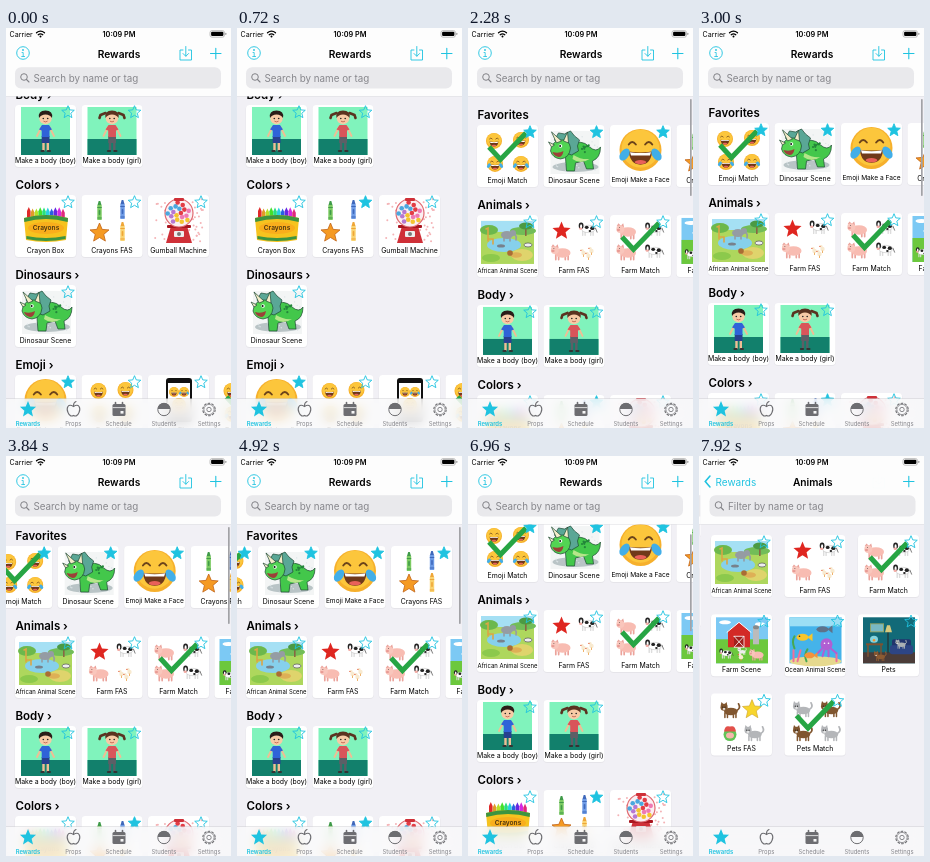
Recreate the animation shown at these times as an HTML page. Size 225 by 400 pixels, loop 8000 ms.

```html
<!DOCTYPE html>
<html lang="en">
<head>
<meta charset="utf-8">
<title>Rewards</title>
<style>
html, body { margin: 0; width: 100%; height: 100%; overflow: hidden; background: #f1f0f5; }
svg { display: block; position: absolute; left: 0; top: 0; font-family: Inter, sans-serif; }
text { dominant-baseline: central; }
#tabs { position: absolute; left: 0; top: 371px; width: 225px; height: 29px;
  background: rgba(249, 249, 250, .8); backdrop-filter: blur(6px); box-shadow: 0 -.5px 0 #cfcfd3; }
</style>
</head>
<body>
<svg id="stage" width="225" height="400" viewBox="0 0 225 400"></svg>
<div id="tabs"></div>
<script>
const CYAN = '#1fc3e0', DURATION = 8000, PITCH = 66.5;

// Drawing helpers; each returns SVG markup.
const ellipse = (x, y, rx, ry, fill, extra = '') => `<ellipse cx="${x}" cy="${y}" rx="${rx}" ry="${ry}" fill="${fill}" ${extra}/>`;
const dot = (x, y, r, fill, extra) => ellipse(x, y, r, r, fill, extra);
const box = (x, y, w, h, fill, r = 0, extra = '') => `<rect x="${x}" y="${y}" width="${w}" height="${h}" rx="${r}" fill="${fill}" ${extra}/>`;
const shape = (d, fill, extra = '') => `<path d="${d}" fill="${fill}" ${extra}/>`;
const line = (d, color, width = 1, cap = 'round') => `<path d="${d}" fill="none" stroke="${color}" stroke-width="${width}" stroke-linecap="${cap}"/>`;
const group = (content, x = 0, y = 0, scale = 1) => `<g transform="translate(${x} ${y}) scale(${scale})">${content}</g>`;
const text = (s, x, y, size, { fill = '#000', weight = 400, anchor = 'middle' } = {}) =>
  `<text x="${x}" y="${y}" font-size="${size}" fill="${fill}" font-weight="${weight}" text-anchor="${anchor}">${s}</text>`;
const star = (x, y, r, fill, extra) => {
  const points = Array.from({ length: 10 }, (_, i) => {
    const a = i * Math.PI / 5, q = i % 2 ? r * .45 : r;
    return `${(x + q * Math.sin(a)).toFixed(2)} ${(y - q * Math.cos(a)).toFixed(2)}`;
  });
  return shape(`M${points.join('L')}Z`, fill, extra);
};
const scatter = (n, seed, draw) => Array.from({ length: n }, (_, i) => {
  const random = k => { const v = Math.sin((i + 1) * 12.99 + k * 78.23 + seed) * 43758.5; return v - Math.floor(v); };
  return draw(random(1), random(2), i);
}).join('');

// Small figures, centred on the origin.
const emoji = (x, y, r, crying) => group(
  dot(0, 0, 10, '#f6b02c') + dot(0, -.6, 9, '#fcc63c') +
  line('M-5.6 -2.6Q-4 -5 -2.2 -2.6M2.2 -2.6Q4 -5 5.6 -2.6', '#6b431a', .9) +
  shape('M-5.5 .8Q0 1.6 5.5 .8Q5 7 0 7Q-5 7 -5.5 .8Z', '#70391a') + shape('M-5 1.1Q0 1.9 5 1.1L4.5 2.6H-4.5Z', '#fff') +
  ellipse(0, 5.8, 2.8, 1, '#e9605a') +
  (crying ? ellipse(-7.6, 2.2, 2, 3.2, '#42aee8', 'transform="rotate(35 -7.6 2.2)"') + ellipse(7.6, 2.2, 2, 3.2, '#42aee8', 'transform="rotate(-35 7.6 2.2)"') : ''), x, y, r / 10);
const check = line('M12 22L23.5 34.5L49 8', '#27a544', 5, 'butt');
const legs = color => line('M-6 3V8M-3 4V8M4 4V8M7 3V8', color, 1.8);
const pig = (x, y, s = .95) => group(legs('#eba39b') + ellipse(1, 1, 8.5, 5, '#f8bcb2') + dot(-7, -2, 4.2, '#f9c6bc') +
  shape('M-11 -5L-9 -8L-7 -6M-6 -6L-4 -8L-3 -4', '#eba39b') + ellipse(-9, -1, 1.8, 1.2, '#e89a94') + dot(-8, -3.6, .5, '#333'), x, y, s);
const cow = (x, y, s = .8) => group(legs('#ddd') + ellipse(1, 0, 8.5, 4.6, '#fff', 'stroke="#aaa" stroke-width=".5"') +
  ellipse(-1, -2, 2.4, 2, '#222') + ellipse(6, -1, 2.6, 2.4, '#222') + ellipse(3, 2.5, 1.6, 1.2, '#222') + ellipse(-8, -4, 3, 4, '#222') +
  ellipse(-8, -3, 1.3, 3, '#fff') + ellipse(-8.5, -.4, 2, 1.5, '#f2aaa3') + line('M10 -1L12 4', '#333', .8), x, y, s);
const pet = (x, y, color, s = .85) => group(legs(color) + ellipse(1, 1, 8, 4.5, color) + dot(-7, -4, 4.2, color) +
  shape('M-11 -6L-10 -10L-7 -7L-4 -10L-3 -5Z', color) + line('M8 0Q13 -3 10 -8', color, 2) +
  dot(-8.5, -4, .7, '#222') + dot(-5.8, -4, .7, '#222') + ellipse(-7, -2, 1.5, 1, '#eee'), x, y, s);
const chick = (x, y) => dot(x, y + 1, 2.2, '#f8ead0') + dot(x - 1.3, y - 1.6, 1.4, '#f8ead0') + line(`M${x} ${y + 3}v1.6`, '#e8912d', .7) + dot(x - 2.6, y - 1.6, .6, '#e0522d');
const crayon = (x, y, color, dark) => shape(`M${x - 2} ${y - 6}L${x - .8} ${y - 10}H${x + .8}L${x + 2} ${y - 6}Z`, dark) +
  box(x - 2.2, y - 6, 4.4, 15, color) + box(x - 2.2, y - 4, 4.4, 1, dark) + box(x - 2.2, y + 6.5, 4.4, 1, dark) + box(x - .8, y - 1, 1.6, 5, dark, .8);
const fourEmoji = emoji(17, 16, 8) + emoji(44, 15, 8) + emoji(18, 39, 8, true) + emoji(44, 39, 8, true);

const kid = (shirt, pants, hair, girl) => box(6, 2, 49, 48, '#80f3bc') + box(6, 34, 49, 16, '#12806c') +
  (girl ? line('M24 8L19 10L18 13M37 8L42 10L43 13', hair, 2.6) : '') +
  line('M26.5 22L22 31M34.5 22L39 31', '#f0bd94', 1.9) + line('M28.5 36V45M32.8 36V45', girl ? pants : '#f0bd94', 2.4) +
  box(26.7, 31, 7.8, 7, pants) + shape('M27 20H34L37 24.5L34.5 25.5V32H26.7V25.5L24 24.5Z', shirt) +
  dot(30.5, 13.2, 6.2, '#f7cba6') + shape('M24 13Q22.6 5.5 30.5 5.5Q38.4 5.5 37 13Q35 9.5 30.5 9.5Q26 9.5 24 13Z', hair) +
  dot(28.3, 13.5, .8, '#222') + dot(32.7, 13.5, .8, '#222') + line('M28.8 16.4Q30.5 17.6 32.2 16.4', '#b5483d', .7) +
  line('M26.4 46H28.6M32.8 46H35', '#333', 2);

const outline = 'stroke="#1d4a33" stroke-width=".7"';
const pictures = {
  emojiMatch: fourEmoji + check,
  emojiSet: fourEmoji,
  emojiFace: emoji(30.5, 25, 21, true),
  emojiPhone: box(18, 3, 26, 44, '#111', 3) + box(20, 8, 22, 34, '#fff') + emoji(26, 17, 5) + emoji(36, 17, 5, true) + emoji(31, 30, 7),
  dinosaur: box(7, 6, 49, 43, '#f3f5f5') + ellipse(32, 42, 23, 5, '#b9c4c6') + scatter(40, 3, (a, b) => dot(9 + a * 45, 8 + b * 39, .7, '#dce4e6')) +
    shape('M24 21Q38 13 46 22Q53 28 57 22Q57 33 49 36L50 44H43L40 36L32 38L31 46H23L22 33Z', '#43c74b', outline) +
    shape('M29 34Q37 40 46 34Q38 35 30 30Z', '#b5e68a') +
    shape('M11 15L15 8L21 9L27 6L31 11L36 15L34 21L35 26L28 30L20 27Z', '#5aa796', outline) +
    shape('M7 26Q8 17 16 15Q26 14 27 23Q26 33 17 34Q9 33 7 26Z', '#52d453', outline) +
    shape('M13 18L8 7L18 16ZM20 16L24 7L25 18ZM8 22L5 17L11 20Z', '#f4ecc8', outline) +
    dot(17, 21, 1.8, '#fff') + dot(16.6, 21, 1, '#111') + shape('M9 27Q15 29 20 26Q19 32 15 32Q10 31 9 27Z', '#9c4038') +
    scatter(9, 9, (a, b) => dot(31 + a * 16, 20 + b * 9, 1.1, '#23863a')),
  crayons: crayon(18, 16, '#7ccb62', '#3f9a48') + crayon(41, 15, '#6d9be6', '#3f68bb') + star(18, 38, 10, '#f59a23', 'stroke="#c2651a" stroke-width=".8"') + crayon(41, 37, '#f9d372', '#efa637'),
  crayonBox: scatter(10, 0, (a, b, i) => shape(`M${12 + i * 3.8} 25V${16 + b * 2}l1.8 -4l1.8 4V25Z`, `hsl(${i * 37} 75% 52%)`)) +
    shape('M9 23Q31 17 53 23L51 45Q31 49 11 45Z', '#f6c31f') + shape('M9 23Q31 17 53 23L52.7 27Q31 21 9.3 27Z', '#3d9440') + shape('M11.4 41Q31 45 50.6 41V44Q31 48 11.4 44Z', '#3d9440') +
    ellipse(31, 33, 18, 6, '#f9ae1c') + text('Crayons', 31, 33, 6.6, { weight: 600, fill: '#4a3310' }),
  gumball: scatter(60, 5, (a, b) => dot(6 + a * 49, 4 + b * 43, 1, '#f4b3b6')) +
    shape('M23 31H39L44 48H18Z', '#cf3038') + box(26, 36, 10, 6, '#eee', 1) + dot(31, 39, 2, '#777') + box(19, 30, 24, 3, '#a9161f', 1) +
    dot(31, 18, 14, '#fbeff2', 'stroke="#e0686f" stroke-width="1.2"') +
    scatter(18, 2, (a, b, i) => dot(31 + Math.sqrt((i + .5) / 18) * 11.5 * Math.cos(i * 2.4), 18 + Math.sqrt((i + .5) / 18) * 11.5 * Math.sin(i * 2.4), 2.3, ['#e23c45', '#f4c430', '#4aa8df', '#ef79b2', '#b778d1'][i % 5])) +
    box(26, 3, 10, 3, '#cf3038', 1),
  africa: box(4, 6, 53, 43, '#aed75d') + box(4, 6, 53, 11, '#a5e0f4') + ellipse(12, 15, 9, 5, '#6cb84c') + ellipse(46, 16, 13, 4, '#72bd58') +
    ellipse(27, 30, 17, 7, '#86d0ec') + ellipse(45, 40, 11, 6, '#dfd46c') + ellipse(14, 43, 9, 4, '#8cc94c') +
    line('M11 26V13L9 14M12 24H16V29', '#dba645', 1.6) + box(48, 11, 1.6, 10, '#8a6642') + ellipse(49, 11, 7, 3.5, '#4b9a43') +
    ellipse(30, 20, 6, 4, '#959ca3') + dot(36, 18, 3, '#959ca3') + line('M38 19Q40 22 39 25M27 22V26M33 22V26', '#959ca3', 1.6) +
    ellipse(39, 40, 6, 2.8, '#deb056') + dot(33, 38, 2.8, '#aa6d34') + ellipse(24, 31, 4, 1.6, '#77818c') + ellipse(51, 30, 4, 2, '#eee', 'stroke="#555" stroke-width=".7"'),
  farmFas: star(18, 16, 9.5, '#df2620') + cow(44, 14) + pig(18, 37) + chick(40, 37) + chick(48, 35) + chick(45, 40),
  farmMatch: pig(17, 16) + cow(44, 14) + pig(17, 37) + cow(44, 36) + check,
  farmScene: box(5, 3, 52, 46, '#7cc9f4') + ellipse(14, 8, 6, 2, '#fff') + ellipse(49, 10, 5, 2, '#fff') + box(5, 25, 52, 24, '#6cc83d') +
    shape('M17 33V17L28 8L39 17V33Z', '#d32a26') + line('M16 18L28 8L40 18', '#fff', 1) + box(23, 22, 10, 11, '#a11f1c') +
    line('M23 22H33V33H23L33 22M23 22L33 33', '#fff', .8) + box(42, 13, 6, 17, '#bbb') + ellipse(45, 13, 3, 2, '#888') +
    cow(15, 39, .6) + pig(46, 40, .7) + chick(30, 42) + pet(31, 37, '#eee', .4),
  ocean: box(5, 3, 52, 46, '#45b3ea') + box(5, 3, 52, 9, '#9cdff5') + ellipse(31, 47, 26, 5, '#e6d98e') +
    line('M9 47V36M13 47L16 36M52 47V39', '#f06f9b', 2) + line('M22 47Q19 41 23 35M10 34Q7 27 10 22', '#47a852', 2) +
    ellipse(42, 30, 6, 6, '#b05fd3') + line('M38 34L33 39M40 35L38 42M44 35V42M46 34L52 39', '#b05fd3', 2) +
    ellipse(18, 23, 6, 3.5, '#f8c62b') + shape('M23 23L28 19V27Z', '#f8c62b') + ellipse(38, 15, 6, 3, '#5e7289') + shape('M43 15L48 11V19Z', '#5e7289') +
    ellipse(25, 41, 5, 3, '#f5923c') + shape('M29 41L33 38V44Z', '#f5923c') + dot(15, 22, .8, '#222') + dot(40, 29, .8, '#fff') + dot(44, 29, .8, '#fff'),
  petsScene: box(5, 3, 52, 46, '#126a78') + box(5, 38, 52, 11, '#4b3c38') + box(12, 9, 14, 9, '#8fa267') + box(13, 10, 12, 7, '#79b9c4') +
    box(34, 25, 19, 14, '#22356d', 2) + box(32, 31, 23, 9, '#2d4585', 2) + line('M30 38V17', '#2b2723') + shape('M27 18H34L32 11H29Z', '#d8c97d') +
    box(8, 29, 17, 2, '#7c5332') + line('M10 31V42M23 31V42', '#7c5332', 1.5) + ellipse(16, 25, 4, 3.5, '#85d3dd') + dot(16, 26, 1.2, '#f29129') +
    pet(22, 42, '#8c5b32', .55) + pet(43, 30, '#aab0b4', .5),
  petsFas: pet(19, 17, '#80562f') + star(41, 16, 10, '#f7d52d', 'stroke="#cda020" stroke-width=".6"') + dot(19, 41, 6.5, '#62c457') + ellipse(19, 42, 4, 3, '#f6b7ad') + shape('M13 38Q14 31 19 33Q24 31 25 38Z', '#e2504a') + pet(43, 40, '#b4b6b9'),
  petsMatch: pet(18, 16, '#b4b6b9') + pet(46, 16, '#80562f') + pet(18, 40, '#80562f') + pet(46, 40, '#b4b6b9') + check,
  boy: kid('#2f63d8', '#27408f', '#2a1d18'),
  girl: kid('#d9555a', '#5c5f66', '#5a3320', true)
};

// A card is [picture, label, starred (or the id of a star that toggles), label size].
const card = ([picture, label, starred, size = 6.9], x, y) => group(
  box(-.4, .3, 61.8, 62.6, '#000', 4, 'opacity=".05"') + box(0, 0, 61, 62, '#fff', 3.5) + pictures[picture] +
  star(53, 7.3, 6.6, starred === true ? CYAN : 'none', `stroke="${CYAN}" stroke-width=".9" stroke-linejoin="round" ${typeof starred === 'string' ? `id="${starred}"` : ''}`) +
  text(label, 30.5, 55.3, size), x, y);

const animals = [['africa', 'African Animal Scene', false, 5.9], ['farmFas', 'Farm FAS'], ['farmMatch', 'Farm Match'], ['farmScene', 'Farm Scene'],
  ['ocean', 'Ocean Animal Scene', false, 6.2], ['petsScene', 'Pets'], ['petsFas', 'Pets FAS'], ['petsMatch', 'Pets Match']];
const sections = [
  ['Favorites', [['emojiMatch', 'Emoji Match', true], ['dinosaur', 'Dinosaur Scene', true], ['emojiFace', 'Emoji Make a Face', true, 6.6], ['crayons', 'Crayons FAS', true]]],
  ['Animals ›', animals.slice(0, 4)],
  ['Body ›', [['boy', 'Make a body (boy)'], ['girl', 'Make a body (girl)']]],
  ['Colors ›', [['crayonBox', 'Crayon Box'], ['crayons', 'Crayons FAS', 'crayonStar'], ['gumball', 'Gumball Machine']]],
  ['Dinosaurs ›', [['dinosaur', 'Dinosaur Scene', 'dinosaurStar']]],
  ['Emoji ›', [['emojiFace', 'Emoji Make a Face', true, 6.6], ['emojiSet', 'Emoji FAS'], ['emojiPhone', 'Emoji Phone'], ['emojiMatch', 'Emoji Match']]]
];

const section = ([title, cards], i) => text(title, 9.5, 80 + 90 * i, 11.5, { weight: 600, anchor: 'start' }) +
  `<g id="row${i}">${cards.map((c, k) => card(c, 9 + k * PITCH, 90 + 90 * i)).join('')}</g>`;
const page = (id, hint, content) => `<g id="${id}">${box(0, 0, 225, 400, '#f1f0f5')}${content}
  ${box(0, 0, 225, 68, '#fdfdfd')}${box(0, 68, 225, .5, '#dadade')}${box(9, 39.3, 206, 21.2, '#e9e9ec', 6)}
  ${dot(18, 49, 3.3, 'none', 'stroke="#828287" stroke-width="1"')}${line('M20.5 51.5L23 54', '#828287', 1.1)}
  ${text(hint, 27.5, 50, 9.8, { fill: '#87878c', anchor: 'start' })}</g>`;

const statusBar = text('Carrier', 3.5, 6, 7.1, { anchor: 'start' }) + text('10:09 PM', 113, 6, 7.3, { weight: 600 }) +
  line('M30.5 4.8Q34.5 1.5 38.5 4.8M32.2 6.7Q34.5 4.9 36.8 6.7', '#000', 1.3) + dot(34.5, 8.4, 1, '#000') +
  box(204, 2.6, 14.5, 6.6, 'none', 2, 'stroke="#999" stroke-width=".6"') + box(205.1, 3.7, 12.3, 4.4, '#000', 1) + box(219.3, 4.8, 1, 2.2, '#999', .5);

document.getElementById('stage').innerHTML =
  page('list', 'Search by name or tag', `<g id="scroll">${sections.map(section).join('')}</g><rect id="thumb" x="222" width="1.7" height="97" rx=".8" fill="#a2a2a6"/>`) +
  page('detail', 'Filter by name or tag', animals.map((c, i) => card(c, 10.5 + i % 3 * 73.5, 79 + Math.floor(i / 3) * 79.3)).join('')) +
  statusBar +
  `<g id="listNav">${dot(17, 25, 6.3, 'none', `stroke="${CYAN}" stroke-width=".9"`)}${dot(17, 22, .9, CYAN)}${line('M16 24.5H17.2V28.5M15.7 28.5H18.6', CYAN, .8)}
  ${line('M177 22H174V32H185.5V22H182.5M179.8 18.5V28M177 25.5L179.8 28.3L182.6 25.5', CYAN, .9)}</g>` +
  line('M204.5 25.5H215M209.8 20.2V30.8', CYAN, 1.1) +
  `<g id="listTitle">${text('Rewards', 113, 25.5, 10.2, { weight: 600 })}</g>
  <g id="back">${line('M10.5 20L5.8 25.5L10.5 31', CYAN, 1.6)}${text('Rewards', 16, 25.5, 10, { fill: CYAN, anchor: 'start' })}</g>
  <g id="detailTitle">${text('Animals', 113, 25.5, 10.2, { weight: 600 })}</g>`;

const GRAY = '#6d6d71', ring = width => `stroke="${GRAY}" stroke-width="${width}"`;
const tabIcons = [
  star(22, 10.5, 8.5, CYAN),
  line('M67.5 7.5C62 4 60 9 62 13.5C63.5 17.5 66 17.5 67.5 16.5C69 17.5 71.5 17.5 73 13.5C75 9 73 4 67.5 7.5ZM67.5 6.5Q67.5 3.5 70 2.5', GRAY, 1.1),
  box(106.5, 5, 13, 12, GRAY, 1.5) + line('M109.5 3.5V6M116.5 3.5V6', GRAY, 1.6) + line('M107 8.6H119', '#f7f7f7', .8) + box(114.5, 12, 3, 2.6, '#f7f7f7'),
  dot(158, 10.5, 6.2, 'none', ring(1)) + shape('M151.8 10Q152 4 158 4Q164 4 164.2 10Z', GRAY),
  dot(203, 10.5, 6.2, 'none', ring(1.1) + ' stroke-dasharray="2.6 1.27"') + dot(203, 10.5, 5.1, 'none', ring(.7)) + dot(203, 10.5, 2.2, 'none', ring(.8))
];
document.getElementById('tabs').innerHTML = `<svg width="225" height="29">${tabIcons.join('')}${['Rewards', 'Props', 'Schedule', 'Students', 'Settings']
  .map((s, i) => text(s, 22 + i * 45.3, 24, 5.9, { fill: i ? '#85858a' : CYAN, weight: i ? 400 : 600 })).join('')}</svg>`;

// Eased interpolation through [time, value] stops.
const track = (t, stops) => {
  const i = stops.findIndex(([time]) => time > t);
  if (i < 1) return i ? stops.at(-1)[1] : stops[0][1];
  const [t0, a] = stops[i - 1], [t1, b] = stops[i], k = (t - t0) / (t1 - t0);
  return a + (b - a) * k * k * (3 - 2 * k);
};
const part = id => document.getElementById(id);
const move = (id, x, y = 0) => part(id).setAttribute('transform', `translate(${x} ${y})`);
const fade = (id, opacity) => part(id).setAttribute('opacity', opacity);

function render(now) {
  const t = now % DURATION;
  const scrollY = track(t, [[1000, -193], [1560, -2], [1800, 8], [3000, 5], [3400, 0], [6400, 0], [6960, -26], [7300, -71]]);
  const scrollX = track(t, [[3480, 0], [4300, -58], [4700, -54.5], [5150, -54.5], [5800, 12], [6000, 7], [6300, 0]]);
  const push = 1 - (1 - Math.min(1, Math.max(0, (t - 7420) / 550))) ** 2.1;
  const slide = push > .99 ? 1.5 : 225 * (1 - push);

  move('scroll', 0, scrollY);
  move('row0', scrollX);
  move('thumb', 0, 71 - Math.min(0, scrollY) * .28);
  fade('thumb', track(t, [[1000, 0], [1150, 1]]));
  part('crayonStar').setAttribute('fill', t < 420 ? 'none' : CYAN);
  part('dinosaurStar').setAttribute('fill', t < 780 ? 'none' : CYAN);

  move('list', -75 * push);
  move('detail', slide);
  part('detail').style.display = push ? '' : 'none';
  move('listTitle', -76 * push);
  move('back', 76 * (1 - push));
  move('detailTitle', 112 * (1 - push));
  fade('listNav', 1 - push);
  fade('listTitle', Math.max(0, 1 - push * 2));
  fade('back', Math.max(0, push * 2 - 1));
  fade('detailTitle', push);
}

const start = performance.now();
function tick() {
  render(performance.now() - start);
  requestAnimationFrame(tick);
}
tick();
</script>
</body>
</html>
```
